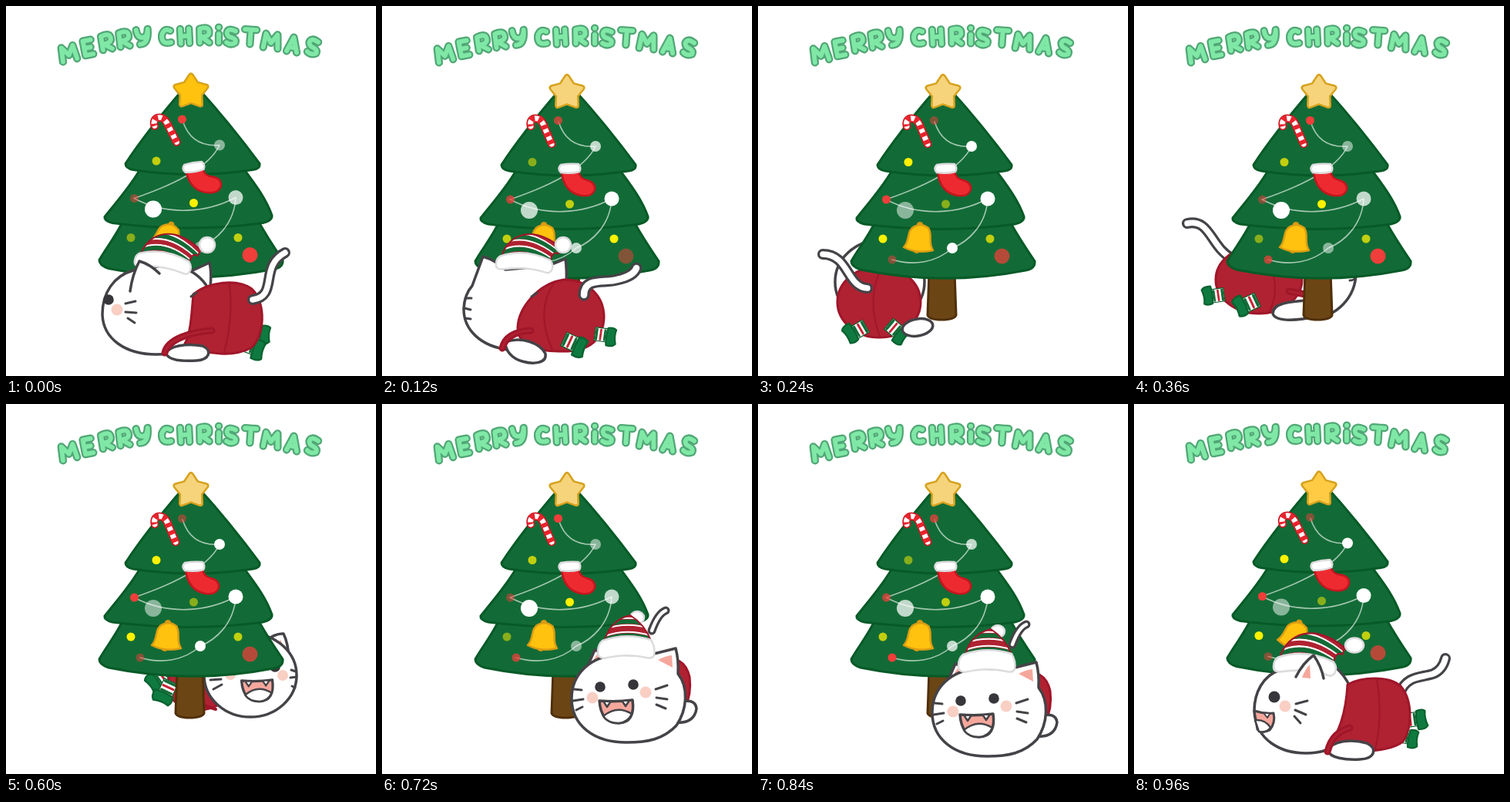
These frames come from a looping animation (480 px wide and 480 px high, 1080 ms). An HTML page:

```html
<!DOCTYPE html>
<html lang="en">
<head>
<meta charset="utf-8">
<title>Merry Christmas</title>
<style>
html, body { margin: 0; width: 100%; height: 100%; overflow: hidden; background: #fff; }
svg { display: block; width: 100vw; height: 100vh; }
path, ellipse, circle { stroke-linecap: round; stroke-linejoin: round; }
</style>
</head>
<body>
<svg id="stage" viewBox="0 0 480 480" role="img" aria-label="Merry Christmas"></svg>
<script>
const STEP = 120, COUNT = 9;
const INK = '#454347', RED = '#b02231', DARK_RED = '#a0162a', GREEN = '#126b36', DARK_GREEN = '#075a27';
const PINK = '#f5a79c', BLUSH = '#f9cfc4', GREY = '#dcdcde';

// Drawing helpers
const shape = (d, fill, stroke = 'none', w = 3) =>
  `<path d="${d}" fill="${fill}" stroke="${stroke}" stroke-width="${w}"/>`;
const line = (d, color = INK, w = 3) => shape(d, 'none', color, w);
const oval = (x, y, rx, ry, fill, stroke = 'none', w = 3, rot = 0) =>
  `<ellipse cx="${x}" cy="${y}" rx="${rx}" ry="${ry}" fill="${fill}" stroke="${stroke}" stroke-width="${w}" transform="rotate(${rot} ${x} ${y})"/>`;
const dot = (x, y, r, fill) => oval(x, y, r, r, fill);
const at = (x, y, rot, scale, art) =>
  `<g transform="translate(${x} ${y}) rotate(${rot}) scale(${scale})">${art}</g>`;
const tube = (d, w = 14, fill = '#fff', edge = INK) => line(d, edge, w) + line(d, fill, w - 6.5);
const sleeve = d => tube(d, 9, RED, DARK_RED);
const white = d => shape(d, '#fff', INK, 3.5);
const red = d => shape(d, RED, DARK_RED);

// Lettering
const GLYPHS = {
  M: 'M-10 10L-8 -9L0 3L8 -9L10 10',
  E: 'M6 -10H-5V10H6M-5 0H4',
  R: 'M-6 10V-9Q7 -13 7 -4Q7 2 -4 2L7 10',
  Y: 'M-8 -10Q-7 1 0 1Q7 1 8 -10Q8 10 -4 10',
  C: 'M6 -8Q-2 -13 -6 -3Q-8 11 6 8',
  H: 'M-6 -10V10M6 -10V10M-6 0H6',
  i: 'M0 -2V10M0 -11h.1',
  S: 'M6 -8Q-5 -13 -6 -5Q-5 0 1 1Q8 3 6 8Q0 12 -6 8',
  T: 'M-8 -10H8M0 -10V10',
  A: 'M-7 10L0 -10L7 10M-4 4H4'
};
const LETTERS = [
  ['M', 81, 62, -13], ['E', 106, 55, -11], ['R', 130, 48, -9], ['R', 153, 44, -7], ['Y', 177, 41, -5],
  ['C', 208, 41, -4], ['H', 232, 40, -3], ['R', 257, 39, -1], ['i', 276, 39, 0], ['S', 292, 41, 2],
  ['T', 317, 41, 4], ['M', 344, 46, 6], ['A', 372, 51, 9], ['S', 398, 54, 12]
];
const lettering = () => [['#50a775', 11], ['#80e8a6', 6.2]].map(([color, w]) =>
  LETTERS.map(([c, x, y, rot]) => at(x, y, rot, .94, line(GLYPHS[c], color, w))).join('')).join('');

// Tree
const tier = d => shape(d, GREEN, DARK_GREEN, 3);
const tiers = () =>
  shape('M222 345L220 401Q222 407 238 407Q255 407 257 401L255 345Z', '#6c4514', '#50300a') +
  tier('M152 280C142 301 130 315 121 331Q121 338 133 342Q240 364 347 343Q360 341 359 331C348 315 338 300 327 280Z') +
  tier('M173 215C160 237 143 256 128 275Q127 280 138 283Q240 296 333 283Q346 280 345 273C337 251 324 234 310 215Z') +
  tier('M231 108C205 138 178 171 155 206Q155 212 165 214Q242 226 320 214Q330 213 329 206C304 172 278 140 249 108Z');

function starPath(cx, cy, outer, inner) {
  const pts = Array.from({ length: 10 }, (_, i) => {
    const a = i * Math.PI / 5, r = i % 2 ? inner : outer;
    return (cx + r * Math.sin(a)).toFixed(1) + ' ' + (cy - r * Math.cos(a)).toFixed(1);
  });
  return 'M' + pts.join('L') + 'Z';
}
const STAR = starPath(240, 112.5, 20.5, 12);

const CANE = 'M220 179L209 153C203 141 190 145 193 156';
const cane = line(CANE, '#cf1722', 10.5) + line(CANE, '#fff', 7) +
  `<path d="${CANE}" fill="none" stroke="#e8232c" stroke-width="7.5" stroke-dasharray="5.5 5" style="stroke-linecap:butt"/>`;
const stocking =
  shape('M233 215L255 214Q256 224 266 226Q277 229 276 238Q273 248 259 246Q236 242 233 215Z', '#ee2a31', '#c4161f', 2.5) +
  shape('M232 206Q243 204 255 205Q259 210 256 215Q244 218 232 216Q227 211 232 206Z', '#fff', GREY, 2.5);
const bell = dot(210, 284, 4, '#d9980f') + dot(206, 316, 5, '#d9980f') +
  shape('M189 313C198 304 192 291 203 286Q212 281 221 288C227 297 220 307 227 317Q207 322 189 313Z', '#ffc20e', '#dc9d12', 2.5);
const STRING = 'M229 150C236 172 252 184 277 182C262 214 210 236 166 251C210 274 260 270 298 250C296 285 272 306 252 314C230 334 200 337 174 329';

// x, y, radius, colour, brightness level in each of three phases
const R = '#f03e3a', W = '#ffffff', Y = '#fff200';
const LIGHTS = [
  [228.5, 148.5, 5.5, R, '012'], [277, 182, 7, W, '210'], [195, 202.5, 5.5, Y, '120'],
  [166.5, 251, 5.5, R, '210'], [298, 250, 9.5, W, '100'], [191, 265, 11, W, '012'],
  [243.5, 257, 5.5, Y, '012'], [301, 302, 5.5, Y, '101'], [162, 302, 5.5, Y, '210'],
  [316.5, 324.5, 10, R, '021'], [252, 314, 7, W, '210'], [174, 329, 5.5, R, '102']
];
const LEVELS = [1, 0.74, 0.5];

function tree(step) {
  const lifted = step === 0 || step === 8;
  const starFill = step === 0 ? '#ffc20e' : step === 8 ? '#ffcb45' : '#f6d47c';
  const sway = (rot, x, y, art) => `<g transform="rotate(${lifted ? rot : 0} ${x} ${y})">${art}</g>`;
  const lights = LIGHTS.map(([x, y, r, color, levels]) =>
    `<circle cx="${x}" cy="${y}" r="${r}" fill="${color}" opacity="${LEVELS[levels[step % 3]]}"/>`).join('');
  return `<g transform="translate(0 ${lifted ? -1.5 : 0})">` + tiers() +
    `<g opacity=".62">${line(STRING, '#fff', 1.6)}</g>` + lights +
    sway(-4, 206, 160, cane) + sway(-7, 243, 211, stocking) + sway(16, 208, 300, bell) +
    line(STAR, '#d6a21c', 8) + shape(STAR, starFill, starFill, 3) + '</g>';
}

// Cat parts
const foot = (x, y, rot, s = 1) => at(x, y, rot, s * 1.2,
  shape('M-12 -8H3V8H-12Z', '#fff', DARK_GREEN, 1) +
  line('M-10 -6V6', GREEN, 3) + line('M-5 -6V6', '#c52434', 2.5) + line('M0 -6V6', GREEN, 2.5) +
  shape('M3 -9Q9 -11 13 -8Q11 0 14 9Q11 13 3 12Q1 2 3 -9Z', '#0f7a3f', '#0a6230', 2));

const stripes = (d, gap) => [[GREEN, 5.5], ['#fff', 2.2], [RED, 5.5], ['#fff', 2.2], [GREEN, 5.5], ['#fff', 2.2], [RED, 5.5], ['#fff', 2.2], [GREEN, 5]]
  .map(([color, w], i) => `<g transform="translate(0 ${-i * gap})">${line(d, color, w)}</g>`).join('');

const DROOP = 'M-30 -7C-23 -36 8 -50 46 -22L43 -14Q35 -18 33 -3Q0 -16 -30 -7Z';
const CONE = 'M-28 -9C-24 -26 -12 -38 5 -42Q24 -30 32 -9Q0 -20 -28 -9Z';
const clips = `<defs><clipPath id="droop"><path d="${DROOP}"/></clipPath><clipPath id="cone"><path d="${CONE}"/></clipPath></defs>`;
const BRIM = 'M-32 -7Q0 -19 33 -5Q39 2 35 9Q32 13 27 11Q0 4 -29 10Q-37 11 -37 4Q-37 -4 -32 -7Z';

const droopHat = (x, y, rot, s, px, py, prx = 10, pry = 10) => at(x, y, rot, s,
  shape(DROOP, RED) +
  `<g clip-path="url(#droop)">${stripes('M-40 -4Q-4 -34 46 4', 4)}</g>` +
  line(DROOP, DARK_RED, 2) + shape(BRIM, '#fff', GREY, 2.5)) +
  oval(px, py, prx, pry, '#fff', GREY, 2.5);

const coneHat = (x, y, rot) => at(x, y, rot, 1,
  oval(14, -39, 9, 8, '#fff', GREY, 2.5) + shape(CONE, RED) +
  `<g clip-path="url(#cone)">${stripes('M-34 -8Q0 -23 38 -9', 4.5)}</g>` + line(CONE, DARK_RED, 2) +
  shape('M-31 -9Q0 -20 32 -10Q38 0 36 10Q33 15 26 13Q0 7 -29 14Q-38 13 -37 5Q-37 -4 -31 -9Z', '#fff', GREY, 2.5));

const mouth = (x, y, s = 1) => at(x, y, 0, s,
  shape('M-22 -13Q0 -11 21 -14Q25 15 3 16Q-20 16 -22 -13Z', PINK, INK, 3.5) +
  shape('M-17 7Q1 -8 20 4Q15 15 3 16Q-11 16 -17 7Z', '#fff', INK, 2.5) +
  shape('M-16 -11l4 6l4 -6M8 -12l4 6l4 -6', '#fff', INK, 2.5));

const eye = (x, y, r = 6.8) => dot(x, y, r, '#37363a');
const cheek = (x, y, r = 7.5) => dot(x, y, r, BLUSH);

// Poses
const runLeft = () =>
  white('M240 344L264 333Q267 345 265 366') +
  foot(328, 424, 8, .9) + foot(319, 442, 20) +
  white('M165 343C140 350 125 372 125 400C126 432 155 452 195 452C240 452 268 425 268 390C268 362 245 338 210 336Z') +
  red('M243 374C262 358 300 353 319 367C338 385 336 430 317 444C298 454 262 455 232 438C240 425 241 395 243 374Z') +
  line('M290 360Q295 405 283 449', DARK_RED, 2) + line('M240 377L247 372') +
  tube('M320 381C354 376 328 338 362 320') +
  droopHat(204, 332, 8, 1, 261, 310) +
  shape('M160 372Q164 348 173 331Q187 335 199 347', '#fff') + line('M161 370Q164 348 173 331Q187 335 199 347', INK, 3.5) +
  eye(133, 381) + cheek(144, 394) + line('M155 386L168 383M155 397L169 398M158 405L167 411') +
  white('M208 451C210 441 235 437 255 441C268 447 264 459 247 460C228 461 211 460 208 451Z') +
  sleeve('M206 450C210 432 240 423 267 421');

const turnAway = () =>
  white('M117 363L131 325Q148 330 160 342L216 337L238 328Q240 342 239 360L225 400C220 435 190 448 165 446C128 442 106 420 106 393Q107 374 117 363Z') +
  line('M108 379H116M107 392L115 394M108 405L115 406') +
  droopHat(185, 333, 3, 1, 235, 310) +
  red('M236 355C265 355 288 374 288 404C287 432 270 448 235 448C200 449 176 440 176 417C177 392 202 360 236 355Z') +
  line('M224 358Q198 395 221 446', DARK_RED, 2) + line('M194 377L201 372') +
  foot(249, 438, 25) + foot(289, 427, 8, .9) +
  tube('M262 375C262 351 290 360 305 355C320 352 328 346 330 340', 15) +
  white('M160 436C180 428 205 437 212 451C214 464 196 465 182 461C168 457 160 447 160 436Z') +
  sleeve('M156 444C160 427 176 422 193 421');

const slipBehind = () =>
  oval(158, 358, 58, 54, '#fff', INK, 3.5) +
  oval(157, 384, 54, 46, RED, DARK_RED) + line('M160 340Q140 380 158 429', DARK_RED, 2) +
  foot(128, 422, 150, .95) + foot(180, 421, 40, .95) +
  tube('M142 366C115 365 118 322 84 322') + oval(207, 417, 20, 11, '#fff', INK, 3.5, -10);

const passBehind = () =>
  tube('M69 282C100 276 98 312 128 328') +
  oval(232, 345, 56, 59, '#fff', INK, 3.5) + line('M280 356Q286 356 287 352') +
  oval(162, 355, 56, 44, RED, DARK_RED) + line('M181 350Q187 375 175 398', DARK_RED, 2) +
  foot(104, 376, 172, .9) + foot(147, 387, 155) +
  white('M180 399C180 386 200 383 228 382L238 402C215 408 184 411 180 399Z') +
  sleeve('M201 370L222 374');

const nearExit = () =>
  tube('M104 300C128 300 130 325 152 340') +
  oval(275, 349, 57, 56, '#fff', INK, 3.5) +
  oval(207, 360, 46, 39, RED, DARK_RED) + foot(158, 372, 165, .95) + foot(187, 386, 145) +
  white('M214 398Q222 384 262 386L268 401Q225 409 214 398Z');

const peek = () =>
  foot(199, 358, 145, .95) + oval(250, 366, 41, 31, RED, DARK_RED) + foot(208, 373, 115) +
  line('M257 391L272 396', DARK_RED, 4) +
  white('M335 308Q350 297 360 298Q366 310 367 330') + shape('M347 316L356 306Q360 313 360 322Z', PINK) +
  oval(317, 352, 60, 54, '#fff', INK, 3.5) +
  eye(349, 341) + cheek(291, 351, 7) + cheek(359, 352, 7) +
  line('M265 358L279 357M269 370L280 364M370 345L376 347M369 355L377 354M371 366L375 368') + mouth(326, 371, .93);

const greet = () =>
  tube('M330 312Q338 290 348 286', 11) +
  shape('M340 350Q372 342 379 372Q382 395 372 415L340 420Z', RED, DARK_RED) +
  white('M362 406Q386 398 388 413Q385 434 358 431Z') +
  white('M249 353L256 337L274 344') + shape('M254 351L260 341L270 347Z', PINK) +
  white('M325 344L361 335Q365 350 364 368C378 386 376 414 362 435C345 453 325 457 297 457C255 457 226 435 226 400C226 368 250 346 285 343Z') +
  shape('M338 350Q347 345 356 344L357 360Z', PINK) +
  coneHat(297, 334, 0) + eye(263, 385) + eye(306, 382) + cheek(253, 399) + cheek(322, 392) +
  line('M335 388L350 383M336 399L350 401M336 408L348 413M229 388L239 389M228 403L241 401M232 415L240 411') +
  mouth(284, 416);

const comeRound = () => at(20, -18, 0, 1, greet());

const dash = () =>
  tube('M345 376C352 352 374 355 388 350C398 346 402 338 404 330') +
  foot(364, 409, -8, .95) + foot(354, 432, 10, .9) +
  white('M190 345C167 352 156 375 156 398C158 436 190 453 223 453C262 453 288 430 288 395Q284 362 262 342Z') +
  red('M277 364C295 354 330 352 346 366C362 385 361 420 349 438C330 452 290 452 250 447C266 428 275 400 277 364Z') +
  line('M315 357Q323 405 313 448', DARK_RED, 2) +
  droopHat(222, 338, 3, 1.1, 286, 313, 12, 9.5) +
  shape('M210 354Q219 336 233 326Q243 340 246 356', '#fff') + line('M210 354Q219 336 233 326Q243 340 246 356', INK, 3.5) +
  shape('M218 355Q222 344 228 338L229 356Z', PINK) +
  eye(182, 380, 7.5) + cheek(196, 392) + line('M210 389L225 385M209 397L223 403M208 405L216 414') +
  shape('M156 398Q168 402 181 401Q184 413 176 423Q167 428 160 422Z', PINK, INK) +
  shape('M157 410Q171 409 177 420Q172 427 162 425Z', '#fff', INK, 2.5) + shape('M169 402l4 5l3 -5', '#fff', INK, 2) +
  white('M252 450C256 437 282 434 302 440C316 447 313 460 293 461C274 462 254 459 252 450Z') +
  sleeve('M251 451C256 432 265 425 280 420');

const POSES = [runLeft, turnAway, slipBehind, passBehind, nearExit, peek, comeRound, greet, dash];
const isBehind = step => step >= 2 && step <= 5;

function scene(step) {
  const cat = POSES[step](), lift = step === 0 || step === 8 ? -1 : 0;
  return `<g visibility="hidden"><g transform="translate(0 ${lift})">${lettering()}</g>` +
    (isBehind(step) ? cat + tree(step) : tree(step) + cat) + '</g>';
}

const stage = document.getElementById('stage');
stage.innerHTML = clips + POSES.map((_, i) => scene(i)).join('');
const scenes = [...stage.children].slice(1);
const start = performance.now();
let shown = -1;

function draw() {
  const step = Math.floor((performance.now() - start) / STEP) % COUNT;
  if (step !== shown) {
    scenes.forEach((g, i) => g.setAttribute('visibility', i === step ? 'visible' : 'hidden'));
    shown = step;
  }
  requestAnimationFrame(draw);
}
draw();
</script>
</body>
</html>
```
